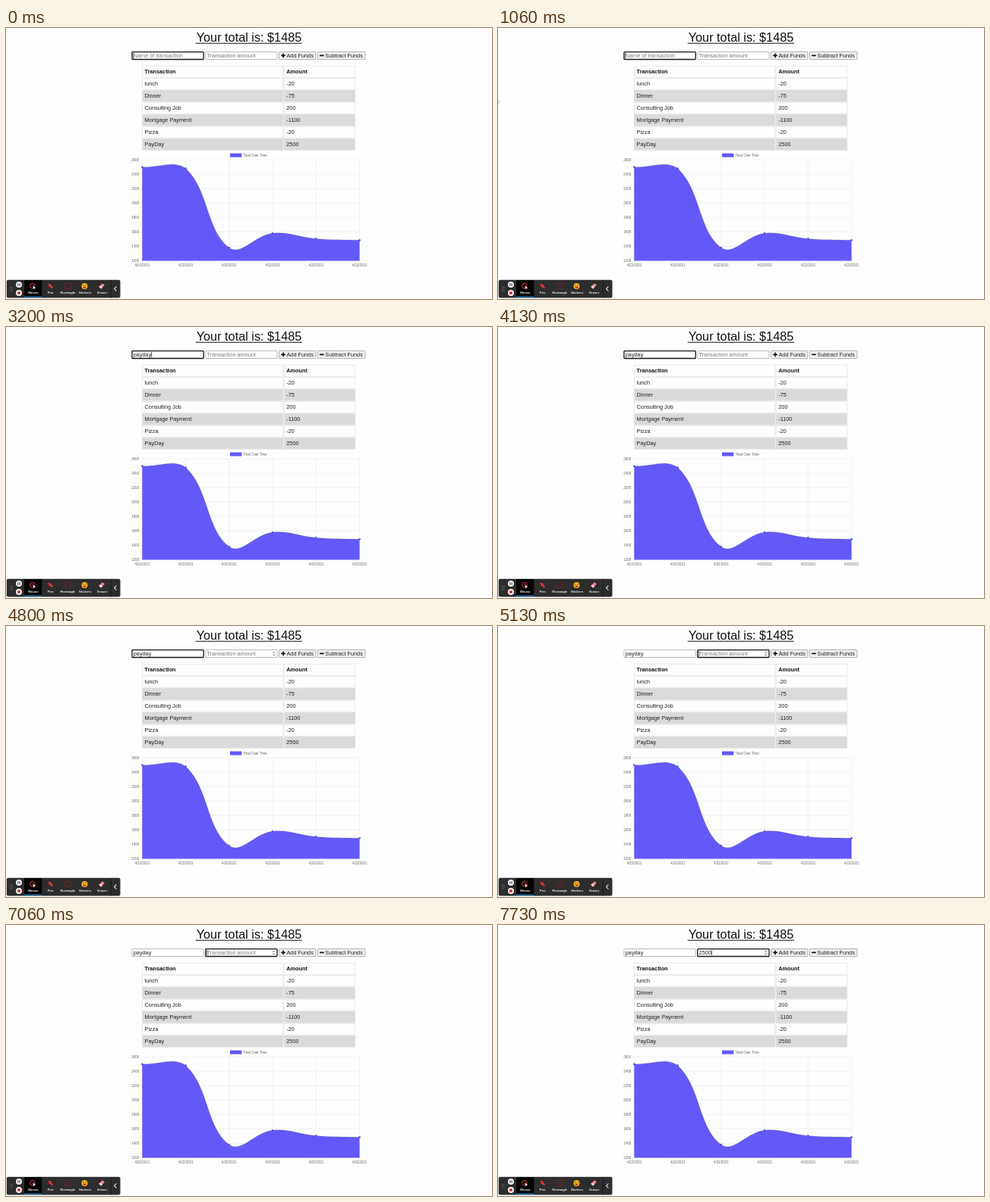
Animation of 640x358 px, one loop 8 s. Source, as an HTML page:

```html
<!DOCTYPE html>
<html lang="en">
<head>
<meta charset="utf-8">
<title>Budget tracker</title>
<style>
  html, body { margin: 0; width: 100%; height: 100%; overflow: hidden; background: #fdfdfd; }
  svg { display: block; width: 100vw; height: 100vh; }
  text { font: 7.3px "Liberation Sans", Arial, sans-serif; fill: #222; }
  .title { font-size: 16.25px; fill: #111; }
  .head { font-weight: bold; fill: #111; }
  .hint { fill: #777; }
  .tick { font-size: 4.45px; fill: #666; }
  .tool { font-size: 4.2px; font-weight: bold; fill: #eee; }
  .mid { text-anchor: middle; }
  .end { text-anchor: end; }
</style>
</head>
<body>
<svg id="stage" viewBox="0 0 640 358" preserveAspectRatio="none"></svg>
<script>
const LOOP = 8000;
const stage = document.getElementById('stage');

function add(tag, attrs, content = '', parent = stage) {
  const el = document.createElementNS('http://www.w3.org/2000/svg', tag);
  for (const name in attrs) el.setAttribute(name, attrs[name]);
  el.textContent = content;
  return parent.appendChild(el);
}
const rect = (x, y, width, height, fill, more = {}) => add('rect', { x, y, width, height, fill, ...more });
const label = (x, y, content, cls = '') => add('text', { x, y, class: cls }, content);
const path = (d, stroke, width = 1, fill = 'none') => add('path', { d, stroke, 'stroke-width': width, fill });
const circle = (cx, cy, r, fill, more = {}) => add('circle', { cx, cy, r, fill, ...more });

function drawHeader() {
  label(320, 18, 'Your total is: $1485', 'title mid');
  rect(249.7, 19.7, 140.2, 1, '#111');
  for (const [x, width, name] of [[359.5, 48.3, 'Add Funds'], [410.3, 62.7, 'Subtract Funds']]) {
    rect(x, 31.4, width, 10.2, '#efefef', { stroke: '#858585', 'stroke-width': .6, rx: 1 });
    label(x + 10, 39.1, name);
    rect(x + 2.7, 35.6, 5.8, 1.6, '#111', { rx: .4 });
  }
  rect(364.3, 33.5, 1.6, 5.8, '#111', { rx: .4 });
}

function drawTable() {
  const rows = [['Transaction', 'Amount'], ['lunch', '-20'], ['Dinner', '-75'], ['Consulting Job', '200'],
    ['Mortgage Payment', '-1100'], ['Pizza', '-20'], ['PayDay', '2500']];
  rows.forEach(([name, amount], i) => {
    const y = 50 + i * 16;
    const fill = i && i % 2 === 0 ? '#dadada' : '#fdfdfd';
    const border = { stroke: '#dedede', 'stroke-width': .6 };
    rect(179.3, y + .2, 185.7, 15, fill, border);
    rect(366.1, y + .2, 93.7, 15, fill, border);
    label(182.6, y + 10, name, i ? '' : 'head');
    label(369.3, y + 10, amount, i ? '' : 'head');
  });
}

function drawChart() {
  const left = 179.3, right = 465.6, top = 174.2, bottom = 307.4;
  const xAt = i => left + i * (right - left) / 5;
  const yAt = value => bottom - (value - 1200) / 1400 * (bottom - top);
  const clampY = y => Math.max(top, Math.min(bottom, y));
  const points = [2500, 2480, 1380, 1580, 1505, 1485].map((v, i) => [xAt(i), yAt(v)]);

  for (let value = 1200; value <= 2600; value += 200) {
    const y = yAt(value);
    path(`M${left - 4} ${y}H${right}`, '#e9e9e9', .6);
    label(175.2, y + 1.5, value, 'tick end');
  }
  points.forEach(([x]) => {
    path(`M${x} ${top}V${bottom + 4}`, '#e9e9e9', .6);
    label(x, 315.4, '4/22/2021', 'tick mid');
  });

  // Smooth curve: handles follow the neighbours' chord, split by segment length.
  const handles = points.map((p, i) => {
    const a = points[i - 1] || p, b = points[i + 1] || p;
    const da = Math.hypot(p[0] - a[0], p[1] - a[1]), db = Math.hypot(b[0] - p[0], b[1] - p[1]);
    const at = k => [p[0] + k * (b[0] - a[0]), clampY(p[1] + k * (b[1] - a[1]))];
    return { before: at(-.4 * da / (da + db)), after: at(.4 * db / (da + db)) };
  });
  const curve = points.map((p, i) =>
    i ? `C${handles[i - 1].after} ${handles[i].before} ${p}` : `M${p}`).join('');
  path(`${curve}V${bottom}H${left}Z`, 'none', 0, '#6459f8');
  path(curve, 'rgba(0,0,0,.1)', 1.3);
  points.forEach(([x, y]) => circle(x, y, 1.3, '#5a50dc'));

  rect(295, 165.6, 15.4, 5, '#6459f8');
  label(312.6, 169.6, 'Total Over Time', 'tick');
}

function drawToolbar() {
  rect(.8, 332.8, 149.7, 23.8, '#2d2d2d', { rx: 2 });
  rect(24, 333, 23.3, 23, '#050505');
  rect(24, 354.4, 23.3, 1.6, '#17689e');
  for (let i = 0; i < 6; i++) circle(6 + i % 2 * 2, 342.5 + (i >> 1) * 2.3, .5, '#999');
  circle(17, 339, 4, '#f4f4f4');
  path('M15.8 337.2v3.6M18.2 337.2v3.6', '#333', 1);
  circle(17, 350, 4, '#f4f4f4');
  rect(15.2, 348.2, 3.6, 3.6, '#d5262c', { rx: .5 });
  ['Mouse', 'Pen', 'Rectangle', 'Stickers', 'Eraser'].forEach((name, i) =>
    label(36 + i * 22.7, 351, name, 'tool mid'));

  circle(35, 340.8, 3.3, 'none', { stroke: '#d8383c', 'stroke-width': 1 });
  path('M35.2 339.8l4.2 4-2 .2-1.2 1.8z', '#111', .3, '#fff');
  path('M55.2 337.4l4 1.4 2.8 4.2-1.2 1.2-4.2-2.8z', 'none', 0, '#d8343a');
  rect(77.7, 337.5, 7.4, 6.6, 'none', { stroke: '#8d2028', 'stroke-width': 1, 'stroke-dasharray': '2 1' });
  circle(103.5, 340.9, 4, '#f5b62e');
  path('M101.2 339.8h1.4M104.5 339.8h1.4', '#59340c', 1);
  path('M101.2 341.7h4.6q-.5 2.2-2.3 2.2t-2.3-2.2z', 'none', 0, '#b73527');
  path('M122.3 342l4.6-4.8 3 2.4-4.6 5z', 'none', 0, '#ee8c92');
  path('M122.3 342l1.7-1.8 3 2.5-1.7 1.9z', 'none', 0, '#f7d2d2');
  path('M138.3 333v23.4', '#171717', .8);
  path('M145.4 341.5l-2.7 3 2.7 3', '#fff', 1.1);
}

function makeField(x, hint) {
  const box = rect(x, 31.6, 94.2, 9.9, '#fff', { rx: .8 });
  const text = label(x + 1.8, 39.1, '');
  const caret = rect(0, 32.9, .7, 7.3, '#111');
  return (value, focused, caretOn) => {
    text.textContent = value || hint;
    text.setAttribute('class', value ? '' : 'hint');
    box.setAttribute('stroke', focused ? '#161616' : '#8a8a8a');
    box.setAttribute('stroke-width', focused ? 1.3 : .6);
    const offset = value ? text.getComputedTextLength() + .1 : -.2;
    caret.setAttribute('x', x + 1.8 + offset);
    caret.setAttribute('visibility', focused && caretOn ? 'visible' : 'hidden');
  };
}

drawHeader();
drawTable();
drawChart();
drawToolbar();
const edgeMark = path('M0 95.6q1.6 .3 1.6 2t-1.6 2', '#aaa', .8);
const setName = makeField(166, 'Name of transaction');
const setAmount = makeField(262.8, 'Transaction amount');
const spinner = path('M351.5 35.7l1.2-1.5 1.2 1.5M351.5 37.5l1.2 1.5 1.2-1.5', '#444', .8);

const NAME_KEYS = [2460, 2530, 2660, 2800, 3060, 3200];
const AMOUNT_KEYS = [7200, 7400, 7600, 7730];
const CARET_FLIPS = [460, 1060, 1530, 2060, 3730, 4260, 4800, 4930, 5460, 6000, 6530, 7060];
const passed = (times, t) => times.filter(time => time <= t).length;
const between = (t, from, to) => t >= from && t < to;
const show = (el, on) => el.setAttribute('visibility', on ? 'visible' : 'hidden');

function render(now) {
  const t = now % LOOP;
  const caretOn = passed(CARET_FLIPS, t) % 2 === 0;
  const onAmount = t >= 4930;
  setName('payday'.slice(0, passed(NAME_KEYS, t)), !onAmount, caretOn);
  setAmount('2500'.slice(0, passed(AMOUNT_KEYS, t)), onAmount, caretOn);
  show(spinner, t >= 4330);
  show(edgeMark, between(t, 200, 2130));
}

const start = performance.now();
function frame() {
  render(performance.now() - start);
  requestAnimationFrame(frame);
}
frame();
</script>
</body>
</html>
```
